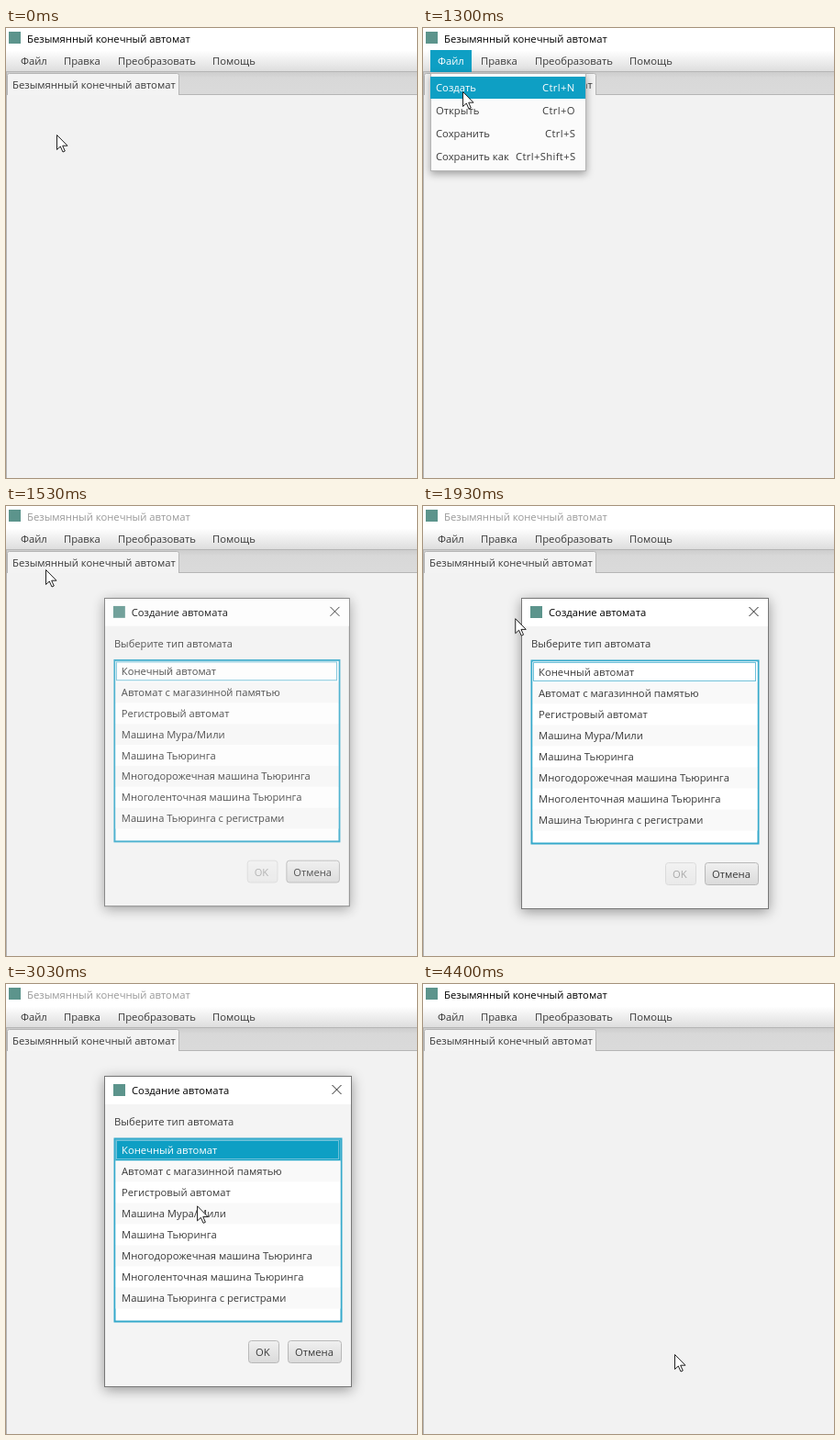
Animation, 448 px wide and 490 px high, one loop 4.43 s. Source, as an HTML page:

```html
<!DOCTYPE html>
<html lang="ru">
<meta charset="utf-8">
<style>
html, body { margin: 0; height: 100%; overflow: hidden; background: #f2f2f2 }
svg { display: block; font: 11.25px "Open Sans", "Noto Sans", sans-serif; fill: #3a3a3a }
.title { fill: #000 }
.inactive .title { fill: #999 }
.icon { fill: #5c948c }
.accent { fill: #0e9fc4 }
.light { fill: #fff }
.keys { letter-spacing: .35px }
.line { fill: none; stroke: #b5b5b5 }
#frame { fill: #f4f4f4; stroke: #777; filter: drop-shadow(0 3px 7px rgba(0,0,0,.38)) }
.inactive #frame { stroke: #aaa; filter: drop-shadow(0 2px 6px rgba(0,0,0,.24)) }
#list { fill: #fff; stroke: #35a9cb; stroke-width: 2 }
.button { fill: url(#button); stroke: #b8b8b8 }
#ok.disabled { opacity: .4 }
#ok.hover .button { fill: #ececec }
#ok.focus .button { fill: url(#pressed); stroke: #2b9fbd; stroke-width: 1.4 }
</style>
<body>
<svg width="448" height="490" viewBox="0 0 448 490">
  <defs>
    <linearGradient id="bar" x2="0" y2="1"><stop stop-color="#fefefe"/><stop offset="1" stop-color="#dcdcdc"/></linearGradient>
    <linearGradient id="strip" x2="0" y2="1"><stop stop-color="#cdcdcd"/><stop offset=".25" stop-color="#d8d8d8"/><stop offset="1" stop-color="#dadada"/></linearGradient>
    <linearGradient id="button" x2="0" y2="1"><stop stop-color="#f0f0f0"/><stop offset="1" stop-color="#dadada"/></linearGradient>
    <linearGradient id="pressed" x2="0" y2="1"><stop stop-color="#e2e2e2"/><stop offset="1" stop-color="#c8c8c8"/></linearGradient>
  </defs>

  <g id="main">
    <rect width="448" height="490" fill="#f2f2f2"/>
    <rect width="448" height="25" fill="#fff"/>
    <rect class="icon" x="3" y="4" width="13" height="13"/>
    <text class="title" x="23" y="16">Безымянный конечный автомат</text>
    <rect y="25" width="448" height="23" fill="url(#bar)"/>
    <rect y="48" width="448" height="25" fill="url(#strip)"/>
    <path class="line" d="M0 47.5H448M188 72.5H448M.5 48V490"/>
    <path d="M1.5 73V51.5q0-2 2-2H186.5q2 0 2 2V73" fill="#f3f3f3" stroke="#b5b5b5"/>
    <text x="7" y="66">Безымянный конечный автомат</text>
    <rect id="fileBack" class="accent" x="8" y="24" width="45" height="24"/>
    <g id="menuBar"></g>
  </g>

  <g id="menu">
    <rect x="8.5" y="49.5" width="169" height="106" fill="#fbfbfb" stroke="#b5b5b5" style="filter:drop-shadow(0 3px 4px rgba(0,0,0,.35))"/>
    <rect id="itemBack" class="accent" x="8" y="53" width="169" height="24"/>
  </g>

  <g id="dialog">
    <rect id="frame" x="107.5" y="100.5" width="269" height="338"/>
    <rect x="108" y="101" width="268" height="30" fill="#fff"/>
    <rect class="icon" x="117" y="109" width="13" height="13"/>
    <text class="title" x="137" y="120">Создание автомата</text>
    <path d="M355.5 110l10 10m0-10l-10 10" stroke="#222"/>
    <text x="118" y="154">Выберите тип автомата</text>
    <rect id="list" x="118.5" y="168.5" width="247" height="199"/>
    <g id="rows"></g>
    <g id="ok">
      <rect class="button" x="264.5" y="388.5" width="33" height="24" rx="3"/>
      <text x="272" y="405">OK</text>
    </g>
    <rect class="button" x="307.5" y="388.5" width="58" height="24" rx="3"/>
    <text x="315" y="405">Отмена</text>
  </g>

  <path id="cursor" d="M.5.5V16.5L4.3 13L7 19L9.3 18L6.7 12.2H12Z" fill="#fff" stroke="#222"/>
</svg>
<script>
const LOOP = 4430;
const $ = id => document.getElementById(id);
const add = (parent, tag, attrs, text = '') => {
  const el = document.createElementNS('http://www.w3.org/2000/svg', tag);
  for (const name in attrs) el.setAttribute(name, attrs[name]);
  el.textContent = text;
  return parent.appendChild(el);
};
const show = (el, on) => el.style.display = on ? '' : 'none';
const clamp = v => Math.min(1, Math.max(0, v));

const [fileLabel] = [['Файл', 16], ['Правка', 63], ['Преобразовать', 122], ['Помощь', 225]]
  .map(([label, x]) => add($('menuBar'), 'text', { x, y: 40 }, label));

const [createItem] = [
  ['Создать', 'Ctrl+N', 130], ['Открыть', 'Ctrl+O', 130],
  ['Сохранить', 'Ctrl+S', 133], ['Сохранить как', 'Ctrl+Shift+S', 101]
].map(([label, keys, x], i) => {
  const item = add($('menu'), 'g', {}), y = 69 + 25 * i;
  add(item, 'text', { x: 14, y }, label);
  add(item, 'text', { x, y, class: 'keys' }, keys);
  return item;
});

const [firstRow] = [
  'Конечный автомат', 'Автомат с магазинной памятью', 'Регистровый автомат', 'Машина Мура/Мили',
  'Машина Тьюринга', 'Многодорожечная машина Тьюринга', 'Многоленточная машина Тьюринга',
  'Машина Тьюринга с регистрами'
].map((label, i) => {
  const row = add($('rows'), 'g', {});
  const back = add(row, 'rect', { x: 119.5, y: 169.5 + 23 * i, width: 245, height: 23, fill: i % 2 ? '#f9f9f9' : '#fff' });
  const text = add(row, 'text', { x: 126, y: 185 + 23 * i }, label);
  return { back, text };
});
const focusRing = add($('rows'), 'rect', { x: 120.5, y: 170.5, width: 242, height: 20, fill: 'none', stroke: '#6fc0d9' });

// Pointer stops: time, x, y
const path = [
  [0, 55, 116], [30, 55, 116], [440, 30, 36], [570, 30, 36], [1000, 43, 69], [1690, 43, 69],
  [1930, 100, 122], [2300, 201, 178], [2760, 201, 178], [3030, 208, 241], [3110, 226, 293],
  [3560, 274, 403], [LOOP, 274, 403]
];
const still = (a, b) => !a || !b || (a[1] === b[1] && a[2] === b[2]);
function slope(i, axis) {
  const [a, b, c] = [path[i - 1], path[i], path[i + 1]];
  return still(a, b) || still(b, c) ? 0 : (c[axis] - a[axis]) / (c[0] - a[0]);
}
function pointer(t, axis) {
  const i = Math.max(0, path.findIndex((p, n) => n && t <= p[0]) - 1);
  const a = path[i], b = path[i + 1], d = b[0] - a[0], s = (t - a[0]) / d;
  const e = s * s * (3 - 2 * s);
  return a[axis] + (b[axis] - a[axis]) * e
    + d * (s * (1 - s) ** 2 * slope(i, axis) - s * s * (1 - s) * slope(i + 1, axis));
}

function draw(t) {
  const menuOpen = t >= 470 && t < 1380;
  const itemHover = t >= 800;
  const selected = t >= 2600;
  const pressed = t >= 3770;
  const closing = t >= 3900;

  show($('menu'), menuOpen);
  show($('fileBack'), menuOpen);
  fileLabel.setAttribute('class', menuOpen ? 'light' : '');
  show($('itemBack'), itemHover);
  createItem.setAttribute('class', itemHover ? 'light' : '');
  $('main').setAttribute('class', t >= 1400 && !closing ? 'inactive' : '');

  // The dialog grows from its top left corner and shrinks to its centre
  const opened = 1 - (1 - clamp((t - 1400) / 200)) ** 1.8;
  const visible = opened * (1 - clamp((t - 3980) / 220));
  const dialog = $('dialog');
  show(dialog, visible > 0);
  dialog.style.opacity = visible;
  dialog.style.transformOrigin = closing ? '241.5px 269px' : '108px 100px';
  dialog.style.transform = `scale(${.945 + .055 * visible})`;
  dialog.setAttribute('class', closing ? 'inactive' : '');

  firstRow.back.setAttribute('fill', pressed ? '#d0d0d0' : selected ? '#0e9fc4' : '#fff');
  firstRow.text.setAttribute('class', selected && !pressed ? 'light' : '');
  show(focusRing, !pressed);
  $('list').style.cssText = pressed ? 'stroke:#c4c4c4;stroke-width:1' : '';
  $('ok').setAttribute('class', !selected ? 'disabled' : pressed ? 'focus' : t > 3480 ? 'hover' : '');

  $('cursor').setAttribute('transform', `translate(${pointer(t, 1)} ${pointer(t, 2)})`);
}

function frame() {
  draw(performance.now() % LOOP);
  requestAnimationFrame(frame);
}
frame();
</script>
</body>
</html>
```
